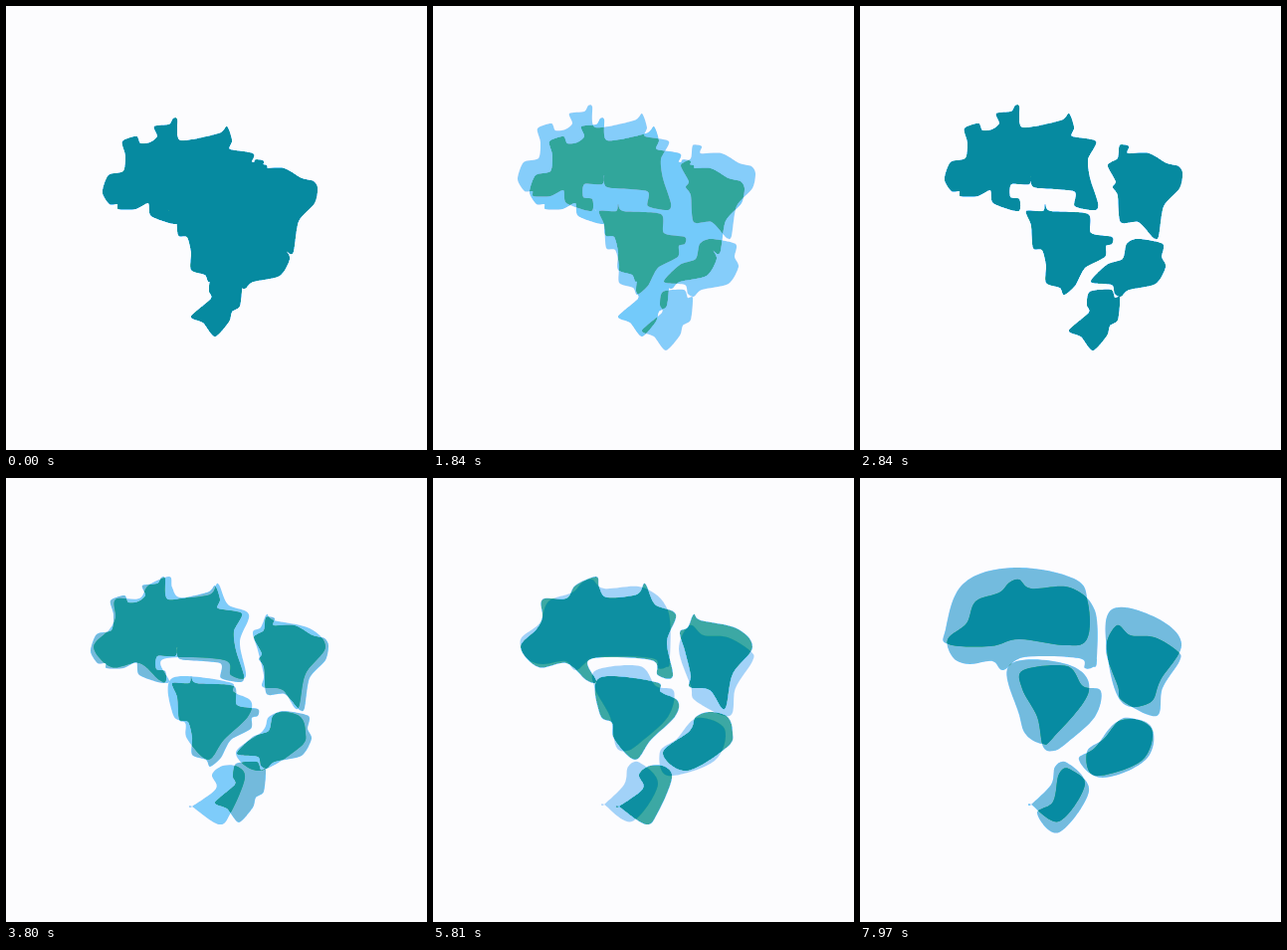
Recreate the animation shown at these times as an HTML page. Size 423 px wide and 446 px high, loop 8000 ms.

```html
<!DOCTYPE html>
<html lang="en">
<head>
<meta charset="utf-8">
<title>Map pieces</title>
<style>
  html, body { margin: 0; width: 100%; height: 100%; overflow: hidden; background: #fcfcfe; }
  svg { display: block; width: 100%; height: 100%; }
</style>
</head>
<body>
<svg viewBox="0 0 423 446" xmlns="http://www.w3.org/2000/svg">
  <defs>
    <filter id="tint" filterUnits="userSpaceOnUse" x="0" y="0" width="423" height="446" color-interpolation-filters="sRGB">
      <feColorMatrix values="0 0 0 1 0  0 0 0 1 0  0 0 0 1 0  0 0 0 0 1"/>
      <feComponentTransfer>
        <feFuncR type="table"/>
        <feFuncG type="table"/>
        <feFuncB type="table"/>
      </feComponentTransfer>
    </filter>
    <g id="detailed">
      <polygon class="north" points="85,174 91,157 106,153 108,137 105,123 119,118 123,125 133,124 140,118 137,108 152,106 156,100 160,101 163,122 202,115 210,108 215,122 213,131 237,136 229,154 231,173 239,198 236,205 216,201 215,186 175,182 172,170 170,179 152,179 151,192 160,194 159,206 134,198 131,185 118,191 101,191 100,186 92,186"/>
      <polygon class="northeast" points="261,140 270,141 269,148 290,148 308,158 320,161 324,168 321,183 305,201 300,231 295,233 280,217 262,217 259,190 254,182 257,176 249,160 259,153"/>
      <polygon class="west" points="167,206 184,206 186,199 191,206 229,209 232,228 253,232 253,239 247,241 246,252 226,263 216,281 205,290 201,283 187,278 187,260 183,245 174,243 172,220"/>
      <polygon class="southeast" points="232,277 248,260 264,254 268,239 279,234 304,239 303,252 307,262 297,279 270,285 262,292 256,289 253,280"/>
      <polygon class="south" points="231,287 252,285 256,293 261,293 259,315 251,321 248,331 234,346 222,332 210,326 230,308 228,300"/>
    </g>
    <g id="simple">
      <polygon class="north" points="88,170 104,152 110,140 110,122 134,121 143,108 164,99 167,110 175,120 205,117 213,106 223,127 244,137 235,165 241,199 226,198 219,183 158,182 164,204 154,203 134,186 106,190"/>
      <polygon class="northeast" points="248,155 256,150 262,137 269,143 305,151 321,170 301,197 293,232 278,213 258,210 259,198 253,173"/>
      <polygon class="west" points="167,201 224,205 229,215 246,224 243,240 219,263 203,283 182,262 180,246 168,238"/>
      <polygon class="southeast" points="231,276 258,254 264,240 279,235 296,240 301,255 296,270 255,294"/>
      <polygon class="south" points="207,298 218,289 233,290 240,302 226,336 214,348 187,330 187,330 211,312"/>
    </g>
    <g id="soft">
      <polygon class="north" points="88,162 107,146 116,124 140,115 150,105 160,102 172,111 211,110 236,133 238,183 234,190 226,191 220,181 165,180 144,193 133,184 110,187 94,181"/>
      <polygon class="northeast" points="258,148 272,158 296,160 319,174 321,184 304,211 298,239 264,224 259,209 247,172"/>
      <polygon class="west" points="164,193 208,189 224,209 242,214 236,240 208,266 195,274 184,270 178,240 163,212"/>
      <polygon class="southeast" points="228,275 245,262 265,241 293,252 283,284 236,299"/>
      <polygon class="south" points="196,290 208,286 226,308 200,345 172,328 172,328 192,308"/>
    </g>
    <g id="round">
      <polygon class="north" points="86,152 104,106 155,90 215,101 229,125 228,162 205,168 160,162 131,169 89,167"/>
      <polygon class="northeast" points="253,132 295,139 323,166 302,203 291,226 262,224 248,172"/>
      <polygon class="west" points="150,188 208,187 230,214 194,261 183,267 167,258 160,238"/>
      <polygon class="southeast" points="220,283 236,271 260,244 292,249 288,282 244,301"/>
      <polygon class="south" points="200,297 212,293 230,315 200,356 178,337 194,325"/>
    </g>
  </defs>
  <g id="stage" filter="url(#tint)"></g>
</svg>
<script>
const LOOP = 8000;

// Colour for ink coverage 0, 0.1 ... 1
const ramp = ['fcfcfe', 'e1edfc', 'cde4fb', 'acd4f8', '82cdfb', '73cafa', '73b6d4', '2da598', '088ca3', '068aa1', '068aa1'];

// Shift that brings each detailed piece back into the whole country
const home = {
  north: [12, 13], northeast: [-11, 15], west: [-1, -13], southeast: [-22, -8], south: [-24, -14]
};
// Covers the seams between the joined pieces
const core = 'M155 195L180 160L240 155L262 160L270 200L285 238L270 255L238 278L210 285L205 265L185 230Z';

// Closed smooth curve; a repeated point makes a corner
function outline(polygon, bend, [dx, dy] = [0, 0]) {
  const pts = Array.from(polygon.points, p => [p.x + dx, p.y + dy]);
  const at = i => pts[(i + pts.length) % pts.length];
  const k = bend / 6;
  const curves = pts.map((p, i) => {
    const prev = at(i - 1), next = at(i + 1), after = at(i + 2);
    const c1 = p.map((v, j) => v + (next[j] - prev[j]) * k);
    const c2 = next.map((v, j) => v - (after[j] - p[j]) * k);
    return `C${c1} ${c2} ${next}`;
  });
  return `M${pts[0]}${curves.join('')}Z`;
}

function pieces(id, bend, shifts = {}) {
  const list = [...document.querySelectorAll(`#${id} polygon`)];
  return list.map(el => outline(el, bend, shifts[el.getAttribute('class')])).join('');
}

const layers = [
  { d: pieces('detailed', 0.75, home) + core, fadeOut: [1200, 2480] },
  { d: pieces('detailed', 0.75), fadeIn: [1200, 2840], fadeOut: [2970, 4940] },
  { d: pieces('simple', 1), fadeIn: [2970, 4940], fadeOut: [5370, 6740] },
  { d: pieces('soft', 1), fadeIn: [5370, 6740], fadeOut: [7240, 8940] },
  { d: pieces('round', 1.1), fadeIn: [7210, 8543] }
];

const stage = document.getElementById('stage');
for (const layer of layers) {
  layer.node = document.createElementNS('http://www.w3.org/2000/svg', 'path');
  layer.node.setAttribute('d', layer.d);
  stage.appendChild(layer.node);
}

['R', 'G', 'B'].forEach((channel, i) => {
  const values = ramp.map(hex => parseInt(hex.slice(i * 2, i * 2 + 2), 16) / 255);
  document.querySelector('feFunc' + channel).setAttribute('tableValues', values.join(' '));
});

function progress(t, [from, to]) {
  return Math.min(1, Math.max(0, (t - from) / (to - from)));
}

function render(t) {
  for (const { node, fadeIn, fadeOut } of layers) {
    const shown = fadeIn ? progress(t, fadeIn) : 1;
    const gone = fadeOut ? progress(t, fadeOut) : 0;
    node.setAttribute('opacity', shown * (1 - gone));
  }
}

const start = performance.now();
function tick() {
  render((performance.now() - start) % LOOP);
  requestAnimationFrame(tick);
}
tick();
</script>
</body>
</html>
```
